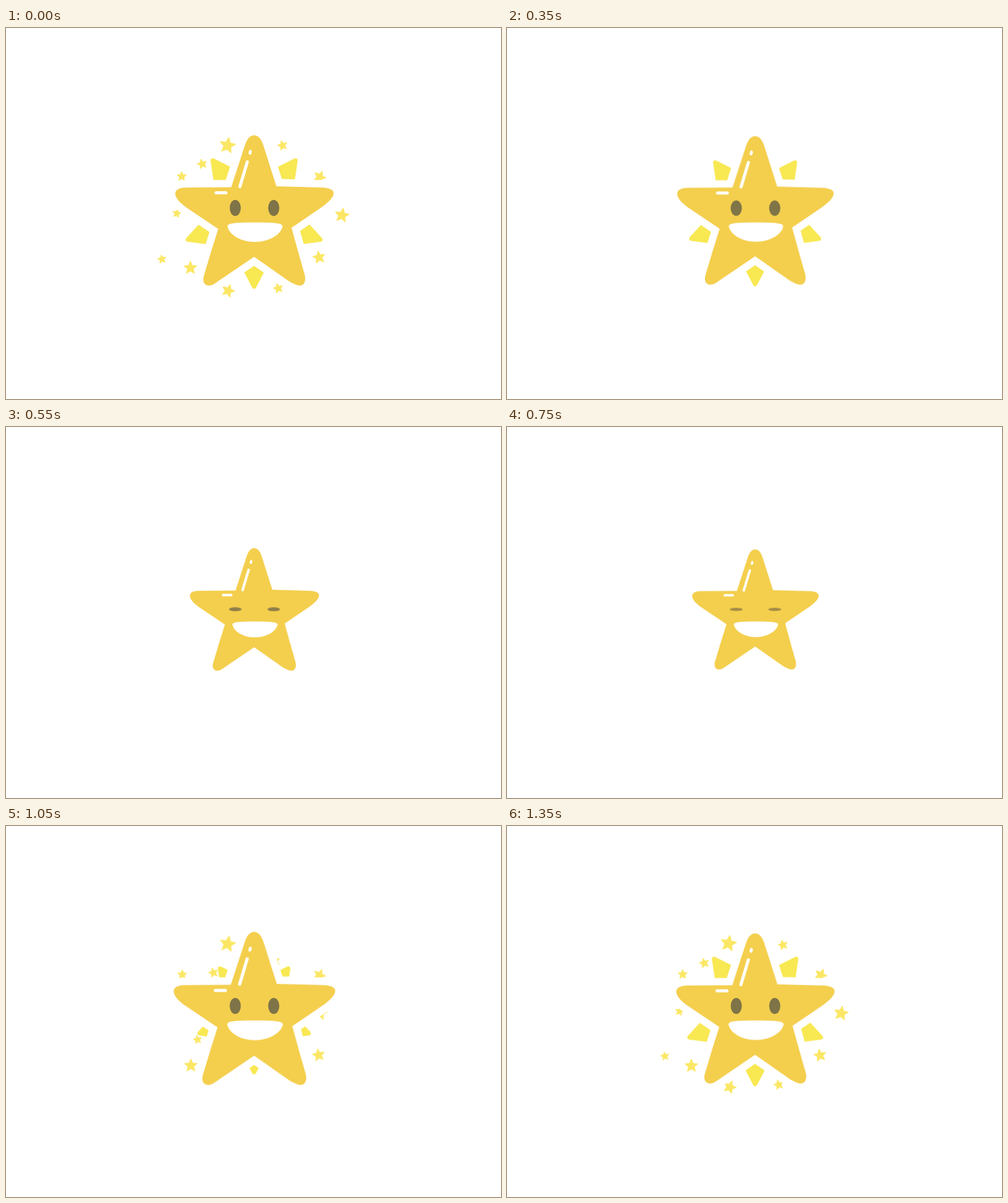
An HTML page for the animation above (1.4 s loop, 800x600 px).

```html
<!DOCTYPE html>
<html lang="en">
<head>
<meta charset="utf-8">
<title>Happy star</title>
<style>
  html, body { margin: 0; width: 100%; height: 100%; overflow: hidden; background: #fff; }
  svg { display: block; width: 800px; height: 600px; }

  .body, .skin, .mouth, .eye, .ray path, .spark {
    animation: 1.4s linear infinite;
  }
  .body { transform-origin: 401.5px 295px; animation-name: pulse; }
  .skin { fill: #f4cf4d; stroke: #f4cf4d; stroke-width: 0; stroke-linejoin: round; animation-name: swell; }
  .halo { fill: #fff; stroke: #fff; stroke-width: 24; }
  .shine { fill: none; stroke: #fff; stroke-width: 5; stroke-linecap: round; }
  .mouth { fill: #fff; transform-origin: 402px 314.5px; animation-name: grin; }
  .eye { fill: #7e7447; transform-box: fill-box; transform-origin: center; animation-name: blink; }
  .ray path { fill: #f8e852; stroke: #f8e852; stroke-width: 7.2; stroke-linejoin: round; animation-name: beam; }
  .spark { fill: #fbe765; stroke: #fbe765; stroke-width: 1; stroke-linejoin: round; }
  .pop { animation-name: pop; }
  .drift { animation-name: drift; }

  /* 1400 ms loop: 3.571% is 50 ms */
  @keyframes pulse {
    0% { transform: scale(1); }
    21.429% { transform: scale(1); animation-timing-function: ease-in-out; }
    42.857% { transform: scale(.805); }
    60.714% { transform: scale(.796); }
    64.286% { transform: scale(.88); }
    67.857% { transform: scale(1.02); }
    71.429% { transform: scale(1.045); }
    75% { transform: scale(1.02); }
    78.571% { transform: scale(1); }
    82.143% { transform: scale(.997); }
    96.429%, 100% { transform: scale(1); }
  }
  @keyframes swell {
    0%, 60.714% { stroke-width: 0; }
    64.286% { stroke-width: 8.5; }
    69%, 100% { stroke-width: 0; }
  }
  @keyframes grin {
    0% { transform: scale(1); }
    21.429% { transform: scale(1); animation-timing-function: ease-in-out; }
    42.857% { transform: scale(.808); }
    60.714% { transform: scale(.796); }
    64.286% { transform: scale(.955, .935); }
    69.643% { transform: scale(1.02); }
    78.571%, 100% { transform: scale(1); }
  }
  @keyframes blink {
    0% { transform: none; fill: #7e7447; }
    21.429% { transform: none; fill: #7e7447; animation-timing-function: ease-in-out; }
    42.857% { transform: translateY(4px) scale(1.14, .21); fill: #91804a; }
    53.571% { transform: translateY(4px) scale(1.16, .2); fill: #a48c47; }
    60.714% { transform: translateY(4px) scale(1.14, .21); fill: #a48c47; }
    64.286% { transform: translateY(2.3px) scale(1, .77); fill: #7e7447; }
    71.429%, 100% { transform: none; fill: #7e7447; }
  }
  @keyframes beam {
    0% { transform: translateY(0); }
    21.429% { transform: translateY(0); animation-timing-function: ease-in-out; }
    42.857%, 60.714% { transform: translateY(-72px); }
    64.286% { transform: translateY(-44px); }
    71.429% { transform: translateY(-26px); }
    82.143% { transform: translateY(-9px); }
    96.429% { transform: translateY(-1px); }
    100% { transform: translateY(0); }
  }
  @keyframes pop {
    0% { transform: translate(var(--x), var(--y)); opacity: 1; }
    14.286% { transform: translate(var(--x), var(--y)); opacity: 0; }
    60.714% { transform: translate(calc(var(--x) * .4), calc(var(--y) * .4)); opacity: 0; }
    60.72% { opacity: 1; }
    64.286% { transform: translate(calc(var(--x) * 1.015), calc(var(--y) * 1.015)); }
    67.857% { transform: translate(calc(var(--x) * 1.03), calc(var(--y) * 1.03)); }
    75%, 82.143% { transform: translate(calc(var(--x) * .993), calc(var(--y) * .993)); }
    96.429%, 100% { transform: translate(var(--x), var(--y)); opacity: 1; }
  }
  @keyframes drift {
    0% { transform: translate(var(--x), var(--y)); opacity: 1; }
    14.286% { transform: translate(calc(var(--x) * 1.01), calc(var(--y) * 1.01)); opacity: 0; }
    60.714% { transform: translate(0, 0); opacity: 0; }
    60.72% { opacity: 1; }
    64.286% { transform: translate(calc(var(--x) * var(--a)), calc(var(--y) * var(--a))); }
    82.143% { transform: translate(calc(var(--x) * var(--b)), calc(var(--y) * var(--b))); }
    96.429% { transform: translate(calc(var(--x) * .978), calc(var(--y) * .978)); }
    100% { transform: translate(var(--x), var(--y)); opacity: 1; }
  }
</style>
</head>
<body>
<svg viewBox="0 0 800 600" aria-label="Smiling star">
  <defs>
    <path id="star" d="M364 257.5L386 190C390 178 395 173.5 401 173.5C407 173.5 412 178 416 190L437 256L511 258
      C523 258.5 529.5 262 529.5 267C529.5 274 521 282 510 290L461.5 323Q472 362 483 400
      C485 409 482 416.5 475 416.5C470 416.5 464 413 458 410L401 370L345 408
      C338 413 333 416.5 328 416.5C320 416.5 317 409 320 400Q331 362 343 325L294 292
      C282 284 273.5 275 273.5 268C273.5 261 281 258 292 258Z"/>
  </defs>

  <g id="rays"></g>
  <g id="sparks" transform="translate(401 300)"></g>

  <g class="body">
    <use href="#star" class="halo"/>
    <use href="#star" class="skin"/>
    <ellipse cx="394.7" cy="201" rx="2.5" ry="4" fill="#fff" transform="rotate(15 394.7 201)"/>
    <path class="shine" d="M390 216.5L378 256.5M339.5 266.5H355.5"/>
  </g>
  <ellipse class="eye" cx="370.5" cy="291" rx="9" ry="13"/>
  <ellipse class="eye" cx="432.7" cy="291" rx="9" ry="13"/>
  <path class="mouth" d="M358 321C358 316 366 314.5 402 314.5C438 314.5 447 316 447 321
    C444 335 424 346 402 346C380 346 361 335 358 321Z"/>
</svg>

<script>
  const NS = 'http://www.w3.org/2000/svg';

  function add(parent, tag, attrs) {
    const el = document.createElementNS(NS, tag);
    for (const key in attrs) el.setAttribute(key, attrs[key]);
    return parent.appendChild(el);
  }

  function starPoints(r, turn) {
    return Array.from({ length: 10 }, (_, i) => {
      const angle = (turn + i * 36) * Math.PI / 180;
      const d = i % 2 ? r * 0.46 : r;
      return `${(d * Math.sin(angle)).toFixed(2)},${(-d * Math.cos(angle)).toFixed(2)}`;
    }).join(' ');
  }

  // tip x, tip y, rotation
  const rays = [
    [401, 418, 0], [294.1, 342.1, 70], [508, 342.1, -70],
    [334.2, 214.3, 144], [467.8, 214.3, -144]
  ];
  for (const [x, y, turn] of rays) {
    const g = add(document.getElementById('rays'), 'g', {
      class: 'ray', transform: `translate(${x} ${y}) rotate(${turn})`
    });
    add(g, 'path', { d: 'M0 0L-20.8 -40H20.8Z' });
  }

  // x, y from the centre, radius, rotation, then early and middle reach for drifting ones
  const sparks = [
    [-43, -110, 13.5, 10], [-117, -60, 8, 0], [106, -59, 10.5, 25],
    [-103, 88, 11, 0], [105, 71, 10.5, -10],
    [-84, -80, 8.3, -15, .65, .87], [46, -110, 8.3, -15, .6, .83],
    [-125, 0, 7.2, 10, .5, .88], [-149, 74, 7.2, -10, .3, .82],
    [142, 3, 12, 10, .6, .85], [-42, 125, 11, 20, .6, .88],
    [39, 121, 8.3, -15, .6, .86]
  ];
  for (const [x, y, r, turn, a, b] of sparks) {
    add(document.getElementById('sparks'), 'polygon', {
      class: a ? 'spark drift' : 'spark pop',
      points: starPoints(r, turn),
      style: `--x:${x}px;--y:${y}px` + (a ? `;--a:${a};--b:${b}` : '')
    });
  }
</script>
</body>
</html>
```
